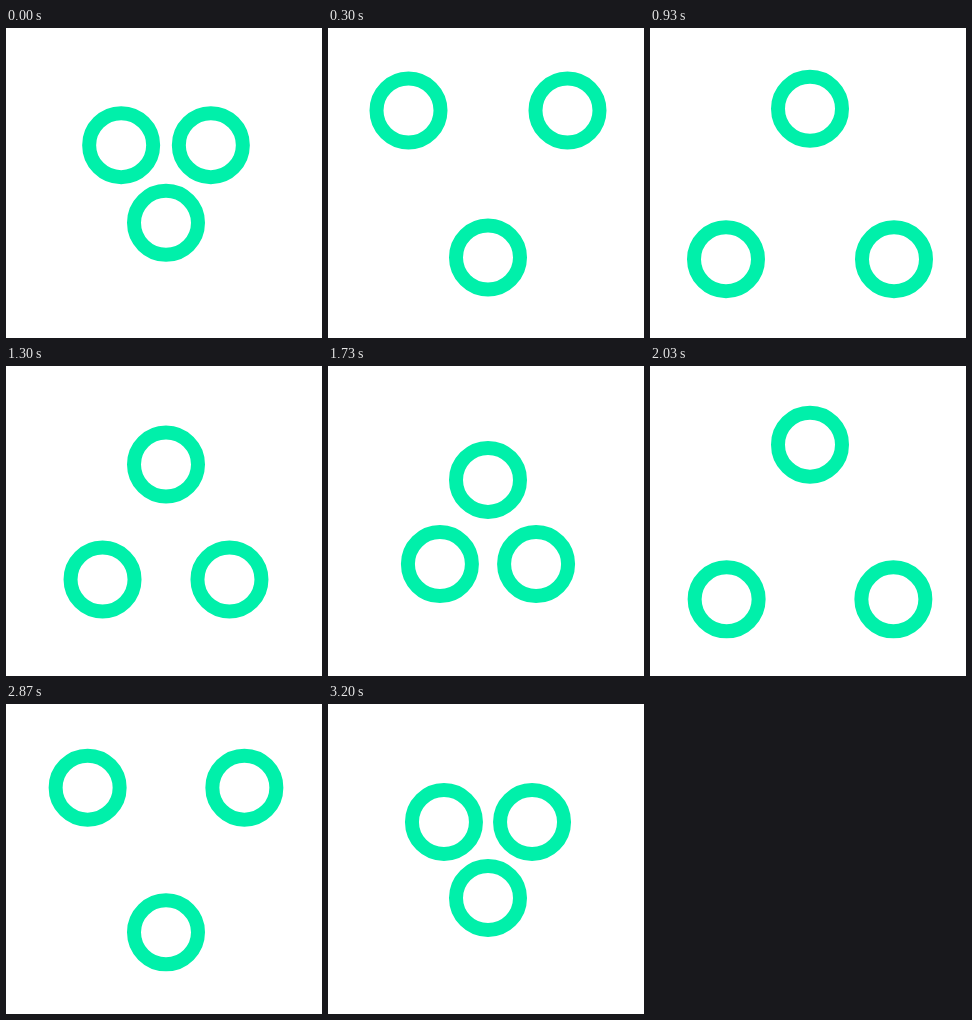
Write an HTML page that moves like this. It is 316 px wide and 310 px high and loops after 3.23 s.

```html
<!DOCTYPE html>
<html lang="en">
<head>
<meta charset="utf-8">
<title>Three rings</title>
<style>
  html, body { margin: 0; width: 100%; height: 100%; overflow: hidden; background: #fff; }
  svg { display: block; }
  circle { fill: none; stroke: #00f0aa; stroke-width: 14; }
</style>
</head>
<body>
<svg width="316" height="310" viewBox="0 0 316 310">
  <circle r="32"/><circle r="32"/><circle r="32"/>
</svg>
<script>
const LOOP = 3230, STEP = 100 / 3;
const NEAR = 44, FAR = 84;
const CX = 160, CY = 156;
// Start of each move: spread, flip, gather, spread, flip back, gather
const starts = [-100, 475, 1023, 1572, 2120, 2687, 3235];
const rings = document.querySelectorAll('circle');

const ease = t => t < .5 ? 4 * t ** 3 : 1 - 4 * (1 - t) ** 3;
const mix = (a, b, p) => a + (b - a) * p;

function place(ring, x, y) {
  ring.setAttribute('cx', x);
  ring.setAttribute('cy', y);
}

function draw(time) {
  // The motion advances at 30 steps per second
  const t = Math.floor((time % LOOP + 4) / STEP) * STEP;
  const move = starts.findIndex((s, i) => t < starts[i + 1]);
  const p = ease((t - starts[move]) / (starts[move + 1] - starts[move]));
  const kind = move % 3;
  const side = move < 3 ? 1 : -1;

  const wide = kind === 0 ? mix(NEAR, FAR, p) : kind === 1 ? FAR : mix(FAR, NEAR, p);
  const turn = kind === 0 ? side : kind === 1 ? side * mix(1, -1, p) : -side;
  const high = (wide - 6) * turn;

  place(rings[0], CX - wide, CY - high);
  place(rings[1], CX + wide, CY - high);
  place(rings[2], CX, CY + high);
}

const begin = performance.now();
function tick() {
  draw(performance.now() - begin);
  requestAnimationFrame(tick);
}
tick();
</script>
</body>
</html>
```
